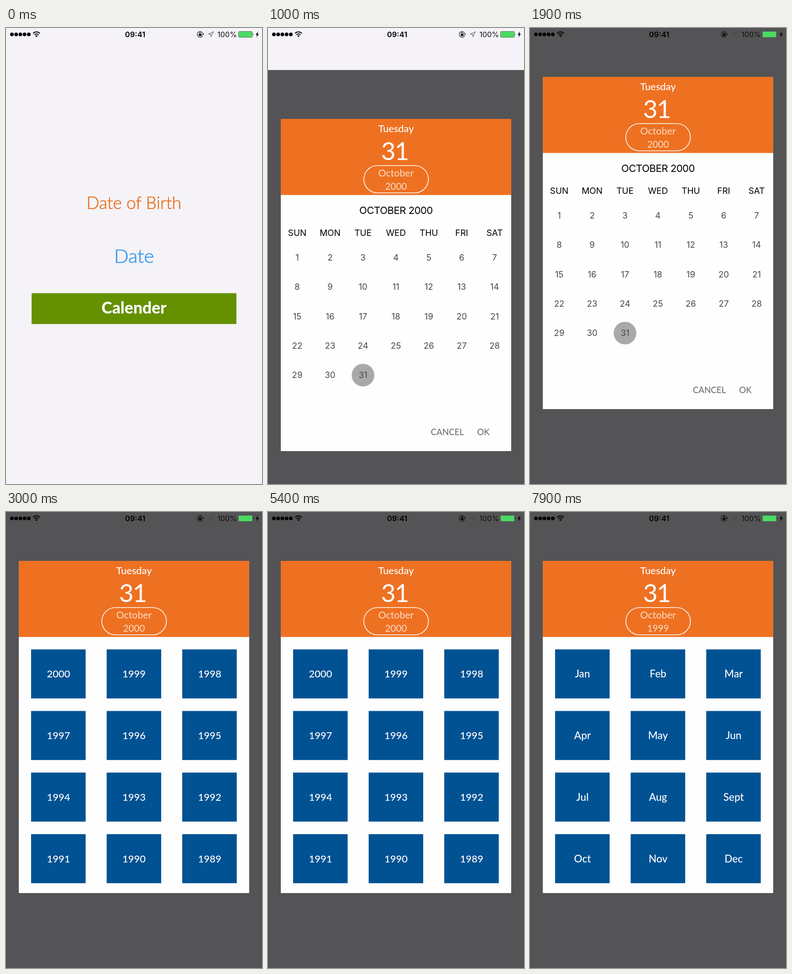
Animation of 561 by 998 pixels, one loop 8 s. Source, as an HTML page:

```html
<!DOCTYPE html>
<html lang="en">
<head>
<meta charset="utf-8">
<title>Date picker</title>
<style>
html, body { margin: 0; width: 100%; height: 100%; overflow: hidden; background: #f5f3f7; }
svg { display: block; width: 561px; height: 998px; }
text { text-anchor: middle; font-family: Lato, "Open Sans", sans-serif; }
.sys { font-family: Inter, Roboto, sans-serif; }
</style>
</head>
<body>
<svg id="stage" viewBox="0 0 561 998" xmlns="http://www.w3.org/2000/svg">
  <rect width="561" height="998" fill="#f5f3f7"/>
  <g id="form"></g>

  <g id="modal">
    <rect width="561" height="998" fill="#010002" fill-opacity=".653"/>
    <rect x="28.05" y="107" width="504.9" height="727" fill="#fefefe"/>
    <rect x="28.05" y="107" width="504.9" height="166.5" fill="#ee7122"/>
    <rect x="210" y="209.3" width="141.5" height="59.5" rx="29.75" fill="none" stroke="#fff" stroke-width="1.6"/>
    <g id="head"></g>
    <g id="calendar"></g>
    <g id="years"></g>
    <g id="months"></g>
  </g>

  <g id="status">
    <g id="dots"></g>
    <g fill="none" stroke="#000" stroke-width="2.1">
      <path d="M59.3 11.6a10.6 10.6 0 0 1 14.9 0"/>
      <path d="M62.3 14.8a6.3 6.3 0 0 1 8.9 0"/>
    </g>
    <path d="M66.75 20l-2.6-2.7a3.7 3.7 0 0 1 5.2 0z"/>
    <g fill="none" stroke="#111" stroke-width="1.2">
      <path d="M431.2 11.2a6.4 6.4 0 1 0 .1 5.4"/>
      <path d="M423.5 13v-1.6a1.9 1.9 0 0 1 3.8 0V13"/>
      <path d="M454.5 8.2L443.4 13.3l5.3.6.4 5.6z" stroke="#444" stroke-width="1"/>
    </g>
    <path d="M422.4 12.8h6v4.6h-6zM429.5 12.6h4.6l-2.3 2.8z"/>
    <rect x="509.5" y="7.5" width="30.5" height="13" rx="2" fill="#4cd964" stroke="#4f5f52" stroke-width=".8"/>
    <path d="M541.3 11.8q1.8 2.2 0 4.4z"/>
    <path d="M552.3 7.4l-5.3 7.4h3.2l-1.5 5.8 5.5-7.6h-3.2z"/>
  </g>
</svg>
<script>
const LOOP = 8000, TICK = 100;
const RISE = 780, RATE = 0.01817;          // critically damped slide-in
const SHOW_YEARS = 2500, SHOW_MONTHS = 6300;
const $ = id => document.getElementById(id);

function add(parent, tag, attrs, str) {
  const el = document.createElementNS("http://www.w3.org/2000/svg", tag);
  for (const k in attrs) el.setAttribute(k, attrs[k]);
  if (str !== undefined) el.textContent = str;
  return $(parent).appendChild(el);
}
const label = (parent, str, x, y, size, fill, weight = 400, more = {}) =>
  add(parent, "text", { x, y, "font-size": size, fill, "font-weight": weight, ...more }, str);
const sys = { class: "sys" };
const edge = stroke => ({ stroke, "stroke-width": 0.7 });

// Form
label("form", "Date of Birth", 280.3, 396, 37.2, "#ea7024", 300, edge("#ea7024"));
label("form", "Date", 280.5, 513.5, 42, "#3597ee", 300, edge("#3597ee"));
add("form", "rect", { x: 56.1, y: 580.4, width: 448.8, height: 67.5, fill: "#659100" });
label("form", "Calender", 280.5, 625, 35.5, "#fff", 800);

// Status bar
for (let i = 0; i < 5; i++) add("dots", "circle", { cx: 13 + 9.25 * i, cy: 14, r: 4 });
label("status", "09:41", 283, 20, 16.6, "#000", 600, sys);
label("status", "100%", 484.7, 20, 16.2, "#111", 400, sys);

// Card header
label("head", "Tuesday", 280.5, 135.5, 21.8, "#fff", 500);
label("head", "31", 277.6, 197, 55, "#fff", 400, { "letter-spacing": -2 });
label("head", "October", 280.5, 232.6, 21.4, "#fbdcc6");
const year = label("head", "2000", 280.5, 261.8, 20.5, "#fbdcc6");

// Month view
const colX = i => 64 + 72.1 * i;
label("calendar", "OCTOBER 2000", 280.5, 315.4, 22.1, "#000", 400, { ...sys, "letter-spacing": -0.5 });
"SUN MON TUE WED THU FRI SAT".split(" ").forEach((d, i) =>
  label("calendar", d, colX(i), 362.8, 18.9, "#000", 400, sys));
add("calendar", "circle", { cx: 208.2, cy: 667.7, r: 24.8, fill: "#a9a8aa" });
for (let d = 0; d < 31; d++)
  label("calendar", d + 1, colX(d % 7), 416.7 + 64.4 * Math.floor(d / 7), 18.6, "#48474a", 400, sys);
label("calendar", "CANCEL", 393, 798.7, 18.8, "#656467");
label("calendar", "OK", 472, 798.7, 18.8, "#656467");

// Tile grids
function grid(parent, names, size) {
  names.forEach((name, i) => {
    const x = 55 + 165.6 * (i % 3), y = 300.7 + 134.8 * Math.floor(i / 3);
    add(parent, "rect", { x, y, width: 119.5, height: 107.3, fill: "#005293" });
    label(parent, name, x + 60, y + 61.7, size, "#fff", 500);
  });
}
grid("years", Array.from({ length: 12 }, (_, i) => 2000 - i), 22);
grid("months", "Jan Feb Mar Apr May Jun Jul Aug Sept Oct Nov Dec".split(" "), 22.6);

const show = (id, on) => $(id).setAttribute("display", on ? "inline" : "none");

function draw(t) {
  const u = Math.max(0, t - RISE) * RATE;
  const drop = Math.round(998 * (1 + u) * Math.exp(-u));
  $("modal").setAttribute("transform", `translate(0 ${drop})`);
  show("calendar", t < SHOW_YEARS);
  show("years", t >= SHOW_YEARS && t < SHOW_MONTHS);
  show("months", t >= SHOW_MONTHS);
  year.textContent = t < SHOW_MONTHS ? "2000" : "1999";
}

const start = performance.now();
function loop(now) {
  const t = Math.max(0, now - start) % LOOP;
  draw(Math.floor(t / TICK) * TICK);
  requestAnimationFrame(loop);
}
draw(0);
requestAnimationFrame(loop);
</script>
</body>
</html>
```
